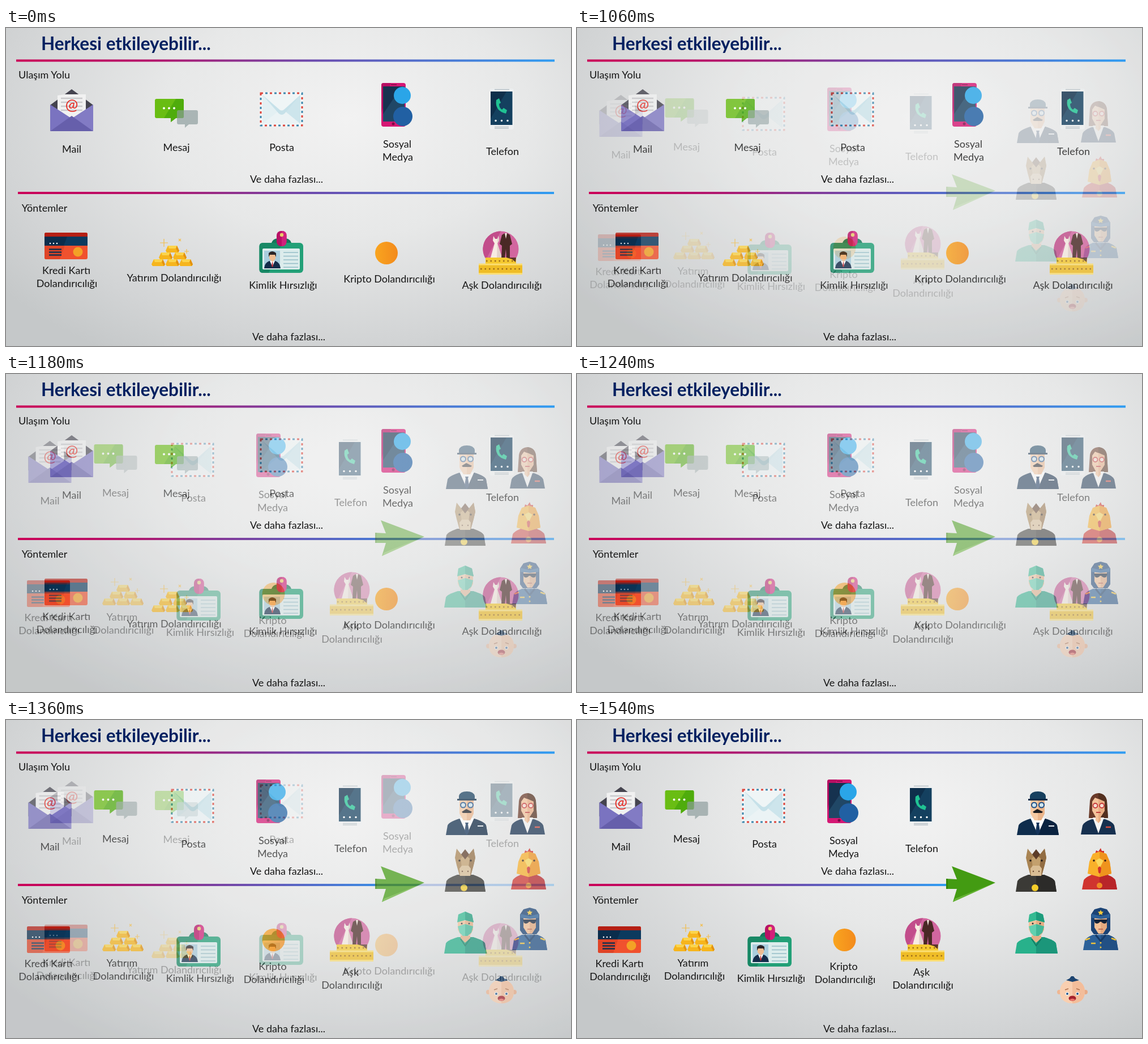
Recreate the animation shown at these times as an HTML page. Size 998 px wide and 561 px high, loop 2540 ms.

```html
<!DOCTYPE html>
<html lang="tr">
<head>
<meta charset="utf-8">
<title>Herkesi etkileyebilir</title>
<style>
html, body { margin: 0; width: 100%; height: 100%; overflow: hidden; }
svg { display: block; width: 998px; height: 561px; }
text { font: 18px Lato, Carlito, sans-serif; fill: #161616; text-anchor: middle; }
.title { font-size: 31.5px; font-weight: 700; fill: #002060; text-anchor: start; }
.at { font-size: 27px; fill: #e5261f; }
</style>
</head>
<body>
<svg viewBox="0 0 998 561" xmlns="http://www.w3.org/2000/svg">
<defs>
  <radialGradient id="glow" gradientUnits="userSpaceOnUse" cx="0" cy="0" r="1" gradientTransform="translate(600 160) scale(770 490)">
    <stop offset="0" stop-color="#f2f2f2"/><stop offset=".42" stop-color="#e7e8e8"/>
    <stop offset=".8" stop-color="#d2d4d5"/><stop offset="1" stop-color="#c5c8c9"/>
  </radialGradient>
  <linearGradient id="rule">
    <stop offset="0" stop-color="#cb0058"/><stop offset=".25" stop-color="#b5146b"/>
    <stop offset=".55" stop-color="#6c4bae"/><stop offset="1" stop-color="#309df2"/>
  </linearGradient>
  <linearGradient id="orange"><stop offset="0" stop-color="#f9a51f"/><stop offset="1" stop-color="#f38a1c"/></linearGradient>

  <g id="base">
    <rect width="998" height="561" fill="url(#glow)"/>
    <text class="title" x="62" y="39">Herkesi etkileyebilir...</text>
    <rect x="18" y="55.5" width="951" height="4" fill="url(#rule)"/>
  </g>

  <g id="mail">
    <path d="M78 136L116 108L154 136V160H78Z" fill="#45444f"/>
    <path d="M91 119L104 117H141V162H91Z" fill="#f1f1f1"/>
    <path d="M97 124H135M97 131H135M97 138H135M97 145H135" stroke="#c9c9cc" stroke-width="2.5"/>
    <path d="M78 135L118 161L78 182Z" fill="#7a73c0"/>
    <path d="M154 135L114 161L154 182Z" fill="#827bc4"/>
    <path d="M78 182L116 155L154 182Z" fill="#665fab"/>
    <text class="at" x="116" y="145">@</text>
  </g>

  <g id="chat">
    <path d="M266 125H311Q314 125 314 128V156Q314 159 311 159H300L291 166V159H266Q263 159 263 156V128Q263 125 266 125Z" fill="#69bd13"/>
    <path d="M300 125H311Q314 125 314 128V156Q314 159 311 159H300L291 166V159H279Z" fill="#4fac0c"/>
    <path d="M279 141.500h.01M288 141.500h.01M297 141.500h.01" stroke="#fff" stroke-width="4" stroke-linecap="round"/>
    <path d="M305 145H336Q339 145 339 148V167Q339 170 336 170H323L316 176V170H305Q302 170 302 167V148Q302 145 305 145Z" fill="#8d9c9c" opacity=".68"/>
  </g>

  <g id="post">
    <rect x="448" y="113" width="77" height="61" fill="#f4f6f7"/>
    <g fill="none" stroke-width="3" stroke-dasharray="4 12">
      <rect x="450" y="115" width="73" height="57" stroke="#dd463c"/>
      <rect x="450" y="115" width="73" height="57" stroke="#3d88ad" stroke-dashoffset="8"/>
    </g>
    <rect x="453" y="118" width="67" height="51" fill="#e3f0f3"/>
    <path d="M520 118V169L489 144Z" fill="#cde5ec"/>
    <path d="M453 169L481 147H493L520 169Z" fill="#ebf3f5"/>
    <path d="M453 118H520L492 151Q487 155 482 151Z" fill="#c6e1e9"/>
    <path d="M453 118H520L491 144Q487 147 483 144Z" fill="#eff5f6"/>
  </g>

  <g id="social">
    <rect x="663" y="97" width="43" height="77" rx="4" fill="#d51874"/>
    <path d="M667 97H680L663 150V101Q663 97 667 97Z" fill="#b70e62"/>
    <rect x="666" y="103" width="38" height="62" fill="#204766"/>
    <path d="M666 103H699L666 152Z" fill="#16324f"/>
    <path d="M680 100H690" stroke="#7f0a45" stroke-width="1.500"/>
    <circle cx="684" cy="169" r="2.500" fill="#7f0a45"/>
    <circle cx="700" cy="119" r="15" fill="#2aa5e8"/>
    <circle cx="701" cy="156" r="17" fill="#2160a3"/>
  </g>

  <g id="phone">
    <rect x="854" y="107" width="43" height="72" rx="4" fill="#eef0f1"/>
    <path d="M863 108.500H889M863 174.500H888M863 177H888" stroke="#b9c2c7" stroke-width="1.500"/>
    <rect x="856" y="112" width="38.500" height="59" fill="#14405f"/>
    <path d="M856 112H884L856 160Z" fill="#0e2f4b"/>
    <path d="M866 127Q863 146 883 151L885 145L879 141L876 144Q871 141 871 134L874 132L871 124Z" fill="#20c293"/>
    <path d="M865 163.500h.01M875.500 163.500h.01M886 163.500h.01" stroke="#fff" stroke-width="3.500" stroke-linecap="round"/>
  </g>

  <g id="card">
    <rect x="68" y="361" width="76" height="47" rx="3" fill="#f0512e"/>
    <path d="M71 361H112L95 408H71Q68 408 68 405V364Q68 361 71 361Z" fill="#df4427"/>
    <path d="M68 369V364Q68 361 71 361H141Q144 361 144 364V369Z" fill="#b51f14"/>
    <rect x="68" y="368" width="76" height="16" fill="#0c3a5e"/>
    <path d="M68 368H108L102 384H68Z" fill="#0a2d4c"/>
    <path d="M78 380h.01M84 380h.01M90 380h.01" stroke="#fff" stroke-width="2.500" stroke-linecap="round"/>
    <path d="M76 390.500H98M76 395.500H98M76 400.500H98" stroke="#17304d" stroke-width="2.500"/>
    <circle cx="127" cy="395" r="8.500" fill="#f3a126"/>
  </g>

  <g id="bar">
    <path d="M4 0H20L24 9L22 12H2L0 9Z" fill="#f6b51d"/>
    <path d="M4 0H20L18 5H6Z" fill="#fbd44c"/>
    <path d="M20 0L24 9L22 12L18 5Z" fill="#e3920f"/>
  </g>
  <g id="gold">
    <use href="#bar" x="282" y="384"/><use href="#bar" x="270" y="396"/><use href="#bar" x="295" y="396"/>
    <use href="#bar" x="257" y="408"/><use href="#bar" x="282" y="408"/><use href="#bar" x="306" y="408"/>
    <path d="M279 372V386M272 379H286M305 372L309 376M309 372L305 376M319 390V398M315 394H323" stroke="#f2bd4c" stroke-width="1.200"/>
  </g>

  <g id="badge">
    <path d="M468 384Q469 372 480 371H494Q504 372 505 384Z" fill="#14775a"/>
    <rect x="447.500" y="379" width="77.500" height="53" rx="6" fill="#22a077"/>
    <path d="M454 379H488L464 432H454Q447.500 432 447.500 426V385Q447.500 379 454 379Z" fill="#188865"/>
    <rect x="453" y="389" width="66" height="37" rx="2" fill="#dcecec"/>
    <rect x="456" y="393" width="28" height="31" fill="#a9cddd"/>
    <path d="M456 424Q457 414 465 411H476Q484 414 485 424Z" fill="#142c4a"/>
    <path d="M466 411L470.500 421L475 411Z" fill="#fff"/>
    <path d="M470 413L469 420L470.500 422L472 420L471 413Z" fill="#b62a32"/>
    <path d="M465 399H476V407L471 413L465 407Z" fill="#efbd93"/>
    <path d="M464 404V397Q470 391 477 397V404L475 400H466Z" fill="#2a2326"/>
    <path d="M490 396H516M490 402.500H516M490 409H516M490 415.500H516M490 422H516" stroke="#94bdc6" stroke-width="1.500"/>
    <rect x="478" y="358" width="17.500" height="27" rx="8" fill="#b81065"/>
    <path d="M487 358Q495.500 358 495.500 366V377Q495 385 487 385Z" fill="#d1217b"/>
    <circle cx="487" cy="365" r="3.200" fill="#e9cc6a"/>
  </g>

  <circle id="coin" cx="672" cy="397" r="20" fill="url(#orange)"/>

  <g id="wedding">
    <circle cx="874" cy="390" r="31.500" fill="#d2669f"/>
    <path d="M874 358.500A31.500 31.500 0 0 0 848 408Z" fill="#c24d8b"/>
    <path d="M861 367L864 372H868L870 367L871 375L868 380L876 405H856L863 380L860 375Z" fill="#f7ece2"/>
    <path d="M868 372L870 367L871 375L868 380L876 405H867Z" fill="#e3d2cb"/>
    <path d="M876 365L881 362H885L890 365L894 381L890 384L890 407H884L883 390L881 407H875L876 384L872 381Z" fill="#4a2925"/>
    <path d="M881 362H885L883 372Z" fill="#f2e6dc"/>
    <rect x="847" y="405" width="54" height="12" fill="#f5c92f"/>
    <rect x="835" y="417" width="77" height="18" fill="#efbd27"/>
    <path d="M835 417H912M835 433.500H912" stroke="#fbde73" stroke-width="3"/>
    <path d="M848 411H900M838 425H911" stroke="#9c6b1b" stroke-width="2.500" stroke-dasharray="2.500 5"/>
    <path d="M884 405L901 405L900 413L894 408Z" fill="#5b342a"/>
  </g>

  <g id="arrow">
    <path d="M652 280L671 281L662 258L739 287L664 321L671 298L652 298Z" fill="#439b12"/>
    <path d="M664 321L739 287L668 315Z" fill="#67b436"/>
    <path d="M652 280H655V298H652Z" fill="#358609"/>
  </g>

  <g id="gent">
    <path d="M777 203L780 186Q782 180 801 174H827Q846 180 848 186L851 203Z" fill="#0f2d4d"/>
    <path d="M814 174H827Q846 180 848 186L851 203H814Z" fill="#0a2340"/>
    <path d="M801 173L814 202L827 173Z" fill="#fff"/>
    <path d="M811 181H817L816 184L818 197L814 203L810 197L812 184Z" fill="#14335a"/>
    <path d="M801 140H826V165L820 177H808L801 165Z" fill="#f6c9a2"/>
    <path d="M814 140H826V165L820 177H814Z" fill="#eab48a"/>
    <path d="M800 139V134Q802 126 814 126Q826 126 828 134V139L831 142H797Z" fill="#17405f"/>
    <path d="M797 139H831V142H797Z" fill="#0c2a46"/>
    <path d="M805 162L813 157L823 162L821 164H807Z" fill="#1b1b20"/>
    <g fill="#cfe5ee" stroke="#1f4f86" stroke-width="2"><circle cx="807.500" cy="150" r="4.500"/><circle cx="820.500" cy="150" r="4.500"/></g>
    <path d="M833 187H843" stroke="#e8eef2" stroke-width="2"/>
  </g>

  <g id="lady">
    <path d="M904 173L906 143Q908 130 921 129Q934 130 936 143L938 173Z" fill="#6a3a29"/>
    <path d="M921 129Q934 130 936 143L938 173H921Z" fill="#54301f"/>
    <path d="M890 202L893 186Q895 180 909 175H933Q947 180 949 186L952 202Z" fill="#16304f"/>
    <path d="M911 172L921 200L931 172Z" fill="#f4f4f4"/>
    <path d="M910 144L915 137L932 144V160L925 171V177L921 182L916 177V171L910 160Z" fill="#f4c39b"/>
    <path d="M921 139L932 144V160L925 171V177L921 182Z" fill="#e8ad83"/>
    <g fill="#f6dcd0" stroke="#c83a3a" stroke-width="1.800"><circle cx="915.500" cy="151" r="4"/><circle cx="927" cy="151" r="4"/></g>
    <path d="M917 163H925" stroke="#c33f3f" stroke-width="2"/>
    <path d="M934 189H943" stroke="#d84a3c" stroke-width="2.500"/>
  </g>

  <g id="horse">
    <path d="M775 303L778 284Q780 279 797 273H825Q842 279 844 284L847 303Z" fill="#3b3a36"/>
    <path d="M811 273H825Q842 279 844 284L847 303H811Z" fill="#2c2b29"/>
    <path d="M796 227L804 237H818L826 227L829 243L826 256L821 274H801L796 256L793 243Z" fill="#a98453"/>
    <path d="M811 237H818L826 227L829 243L826 256L821 274H811Z" fill="#926d43"/>
    <path d="M803 244L811 238L819 244L817 260H805Z" fill="#c3a06d"/>
    <path d="M801 262L805 257H817L821 262L820 275H802Z" fill="#d9bd94"/>
    <path d="M804 237L811 228L818 237L811 246Z" fill="#5d3d29"/>
    <path d="M801 248h.01M821 248h.01" stroke="#1d1716" stroke-width="3.500" stroke-linecap="round"/>
    <path d="M806 267h.01M816 267h.01" stroke="#6e4c33" stroke-width="2.500" stroke-linecap="round"/>
    <circle cx="809" cy="296" r="6" fill="#f4cd2a"/>
  </g>

  <g id="rooster">
    <path d="M892 299L895 283Q897 278 909 273H937Q949 278 951 283L954 299Z" fill="#d0342f"/>
    <path d="M923 273H937Q949 278 951 283L954 299H923Z" fill="#b82529"/>
    <path d="M915 237L917 230L921 232L925 226L927 231L931 231L931 239Z" fill="#d3302b"/>
    <path d="M911 236L923 232L935 236L941 250L944 271L923 277L902 271L905 250Z" fill="#f9b02a"/>
    <path d="M923 232L935 236L941 250L944 271L923 277Z" fill="#ef931d"/>
    <path d="M916 248L923 244L930 248L923 262Z" fill="#fbd75b"/>
    <path d="M920 261L923 258L926 261L925 269L923 271L921 269Z" fill="#d3302b"/>
    <path d="M913 248h.01M933 248h.01" stroke="#2a1a18" stroke-width="3.500" stroke-linecap="round"/>
    <circle cx="923" cy="292" r="5" fill="#f08a24"/>
  </g>

  <g id="medic">
    <path d="M774 412L777 394Q779 389 798 383H825Q844 389 846 394L849 412Z" fill="#28b18b"/>
    <path d="M811 383H825Q844 389 846 394L849 412H811Z" fill="#1b967a"/>
    <path d="M803 380H820V385L811 393L803 385Z" fill="#e6b088"/>
    <path d="M798 354H825V370L820 379H803L798 370Z" fill="#f4c39b"/>
    <path d="M811 354H825V370L820 379H811Z" fill="#e7ad83"/>
    <path d="M797 357L799 343L811 338L823 343L826 357L811 353Z" fill="#34ba92"/>
    <path d="M811 338L823 343L826 357L811 353Z" fill="#1d9c7c"/>
    <path d="M798 364L811 360L825 364L822 375L815 381H807L801 375Z" fill="#62d0b0"/>
    <path d="M811 360L825 364L822 375L815 381H811Z" fill="#43b898"/>
    <path d="M805 359h.01M818 359h.01" stroke="#26323a" stroke-width="3" stroke-linecap="round"/>
    <path d="M803 386L811 398L820 386" fill="none" stroke="#127a62" stroke-width="2"/>
  </g>

  <g id="officer">
    <path d="M894 406L897 389Q899 384 911 379H939Q951 384 953 389L956 406Z" fill="#2c6199"/>
    <path d="M925 379H939Q951 384 953 389L956 406H925Z" fill="#225084"/>
    <path d="M908 343L914 334L925 331L936 334L942 343V371L937 378H913L908 371Z" fill="#1b4375"/>
    <path d="M914 347H936V366L929 377H921L914 366Z" fill="#f2c097"/>
    <path d="M925 347H936V366L929 377H925Z" fill="#e4a97f"/>
    <path d="M909 342L925 346L941 342V349L925 351L909 349Z" fill="#2c6199"/>
    <path d="M925 335L926.500 338L930 338.500L927.500 341L928 344L925 342.500L922 344L922.500 341L920 338.500L923.500 338Z" fill="#f4c93a"/>
    <path d="M913 352H937L935 358Q930 361 926 356H924Q920 361 915 358Z" fill="#132238"/>
    <path d="M921 369H929" stroke="#b45a48" stroke-width="1.500"/>
    <path d="M916 379L925 390L934 379" fill="none" stroke="#163a66" stroke-width="3"/>
    <path d="M898 388L906 385M944 385L952 388M908 394H916" stroke="#f0c23a" stroke-width="2.500"/>
    <path d="M925 393v.01M925 401v.01" stroke="#f0c23a" stroke-width="3" stroke-linecap="round"/>
  </g>

  <g id="baby">
    <circle cx="852" cy="480" r="4" fill="#efb793"/><circle cx="898" cy="480" r="4" fill="#e8ab87"/>
    <path d="M853 477Q855 459 875 458Q895 459 897 477Q898 499 875 500Q852 499 853 477Z" fill="#f9cfb0"/>
    <path d="M875 458Q895 459 897 477Q898 499 875 500Z" fill="#f3bd9a"/>
    <path d="M864 459L870 456L873 452H877L880 456L887 459L875 462Z" fill="#1c4470"/>
    <path d="M866 483h.01M884 483h.01" stroke="#fff" stroke-width="6" stroke-linecap="round"/>
    <path d="M866 483h.01M884 483h.01" stroke="#27588c" stroke-width="4" stroke-linecap="round"/>
    <path d="M862 476L868 474M882 474L888 476" stroke="#b06f4b" stroke-width="1.500"/>
    <ellipse cx="875" cy="491" rx="6.500" ry="4.500" fill="#a3202c"/>
    <path d="M870 493Q875 490 880 493Q875 498 870 493Z" fill="#ee7469"/>
  </g>
</defs>
<g id="before"></g>
<g id="after"></g>
</svg>
<script>
const LOOP = 2540, HOLD = 1000, FADE = 600, STEPS = 10, LINE = 23;
const fraud = 'Dolandırıcılığı';

const use = (id, dx = 0, dy = 0) => `<use href="#${id}" x="${dx}" y="${dy}"/>`;
const label = (s, x, y) => `<text x="${x}" y="${y}">${s}</text>`;
const pair = (a, b, x, y, shift = 1) => label(a, x, y) + label(b, x + shift, y + LINE);
const divider = width => `<rect x="21" y="289" width="${width}" height="4" fill="url(#rule)"/>`;

const shared = use('base') +
  label('Ulaşım Yolu', 67.5, 89) + label('Yöntemler', 68, 324) +
  label('Ve daha fazlası...', 495.5, 273) + label('Ve daha fazlası...', 499.5, 551);

// How far each icon sits from its first place in the second layout.
const shifts = {
  mail: [-38.5, 10], chat: [-107.5, -1], post: [-157, 8], social: [-221, 8], phone: [-268, 8],
  card: [-31, 3], gold: [-87, -12], badge: [-146, 3], coin: [-199.5, -9], wedding: [-263, -9]
};
const people = ['gent', 'lady', 'horse', 'rooster', 'medic', 'officer', 'baby'];
const icons = Object.entries(shifts);

const before = document.getElementById('before');
const after = document.getElementById('after');

before.innerHTML = shared + divider(947) + icons.map(([id]) => use(id)).join('') +
  label('Mail', 116, 220) + label('Mesaj', 301, 217) + label('Posta', 487, 217) +
  pair('Sosyal', 'Medya', 691, 211) + label('Telefon', 877, 224) +
  pair('Kredi Kartı', fraud, 106.5, 434) + label(`Yatırım ${fraud}`, 297, 447) +
  label('Kimlik Hırsızlığı', 489.5, 460) + label(`Kripto ${fraud}`, 677, 449) +
  label(`Aşk ${fraud}`, 876, 460);

after.innerHTML = shared + divider(632) + icons.map(([id, d]) => use(id, ...d)).join('') +
  use('arrow') + people.map(id => use(id)).join('') +
  label('Mail', 77.5, 230) + label('Mesaj', 193.5, 216) + label('Posta', 331, 225) +
  pair('Sosyal', 'Medya', 471, 219, 0) + label('Telefon', 609, 233) +
  pair('Kredi Kartı', fraud, 75, 436) + pair('Yatırım', fraud, 205, 435, 2.5) +
  label('Kimlik Hırsızlığı', 343, 462) + pair('Kripto', fraud, 471, 440.5, 2.5) +
  pair('Aşk', fraud, 608.5, 451, 2.5);

after.animate([
  { opacity: 0, offset: 0 },
  { opacity: 0, offset: HOLD / LOOP, easing: `steps(${STEPS}, start)` },
  { opacity: 1, offset: (HOLD + FADE) / LOOP },
  { opacity: 1, offset: 1 }
], { duration: LOOP, iterations: Infinity });
</script>
</body>
</html>
```
